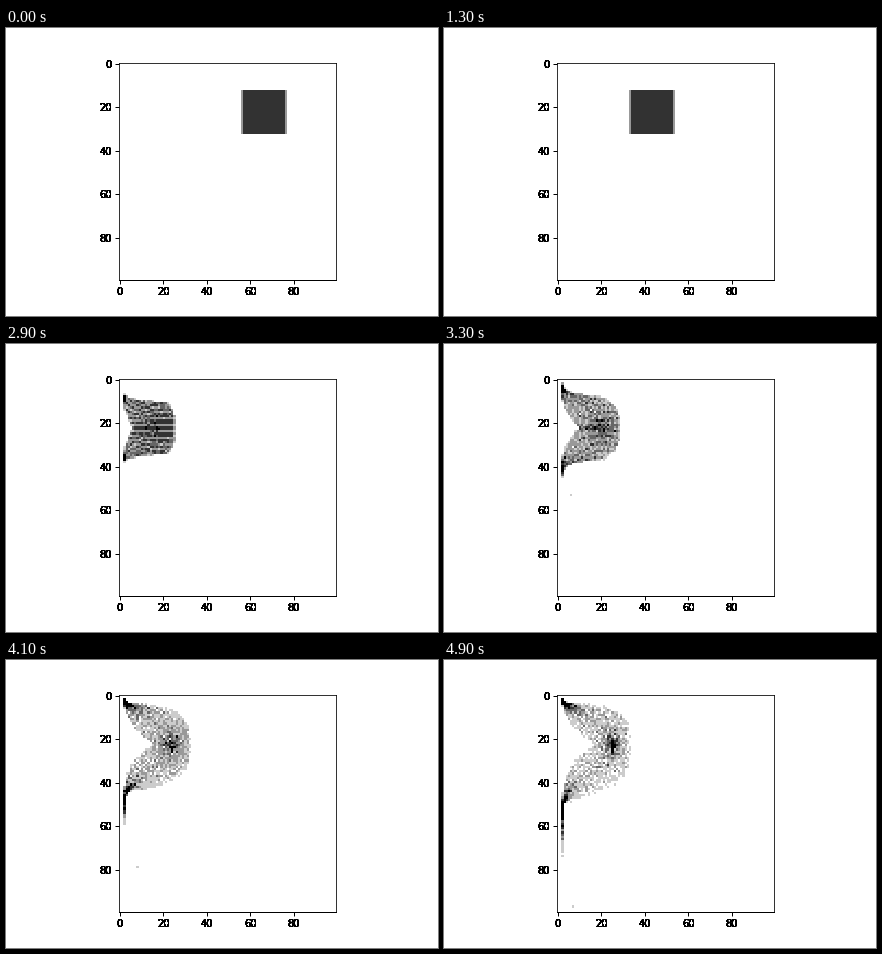
A matplotlib script for the animation above (5 s loop, 432x288 px).

```python
import numpy as np
import matplotlib.pyplot as plt
from matplotlib.animation import FuncAnimation

WIDTH, HEIGHT, DPI = 432, 288, 72
GRID = 100        # cells per side
SIDE = 40         # particles per side of the block
FRAMES = 50
IMPACT = 26       # step at which the block reaches the wall
FALL = 0.0229     # half the acceleration towards the left wall
WALL = 2          # first cell the particles may enter
FULL = 5          # particles in a cell that give pure black

plt.rcParams.update({"font.family": "DejaVu Sans", "font.size": 10})

rng = np.random.default_rng(4)
jitter = rng.normal(0, 0.015, (2, SIDE, SIDE))
steps = np.arange(SIDE)
depth, place = np.meshgrid(steps / (SIDE - 1),              # 0 hits first
                           np.linspace(-1, 1, SIDE),        # top to bottom
                           indexing="ij")


def block(step):
    """Rigid block in free fall."""
    left = 56.9 - 1.471 * step - FALL * step**2
    return np.array(np.meshgrid(left + steps / 2, 13.25 + steps / 2,
                                indexing="ij"))


def splash_velocity():
    """The middle bounces back while the flanks shoot along the wall."""
    bounce = 1.08 + 0.16 * np.cos(np.pi * (depth - 0.15) / 0.7)
    drag = (2.2 - 0.9 * depth) * np.abs(place) ** (1.1 + 2.9 * depth**2)
    spread = 0.7 + 1.1 * (1 - depth) ** 2.5
    along = np.sign(place) * np.abs(place) ** (1 + 0.6 * (1 - depth))
    return np.array([bounce - drag, spread * along])


VELOCITY = splash_velocity() + jitter


def positions(step):
    if step <= IMPACT:
        return block(step)
    time = step - IMPACT
    free = block(IMPACT) + VELOCITY * time
    free[0] -= FALL * time**2
    # Particles pile up softly at the left and upper walls.
    soft = 0.25 * time
    return WALL + soft * np.logaddexp(0, (free - WALL) / soft)


def density(step):
    cols, rows = np.clip(positions(step), WALL, GRID - 1).astype(int)
    cells = np.zeros((GRID, GRID))
    np.add.at(cells, (rows, cols), 1)
    if step >= 30:  # stray drop
        row = min(53.2 + 3.25 * (step - 33), 97)
        col = 8.4 - 0.027 * (step - 42) ** 2
        cells[int(row), int(col)] += 1
    return cells


fig = plt.figure(figsize=(WIDTH / DPI, HEIGHT / DPI), dpi=DPI,
                 facecolor="white")
SIZE = 0.755 * HEIGHT
ax = fig.add_axes([(221.4 - SIZE / 2) / WIDTH, 0.125, SIZE / WIDTH, 0.755])
image = ax.imshow(density(0), cmap="gray_r", vmin=0, vmax=FULL,
                  interpolation="nearest", aspect="auto")
ticks = range(0, GRID, 20)
ax.set(xticks=ticks, yticks=ticks)
ax.tick_params(width=1, length=4, pad=3)
ax.spines["bottom"].set_linewidth(1)

# Stacked labels give the numbers their hard, heavy edges.
x_place, x_va, x_ha = ax.get_xaxis_text1_transform(7)
y_place, y_va, y_ha = ax.get_yaxis_text1_transform(7)
for _ in range(25):
    for tick in ticks:
        ax.text(tick, 0, str(tick), transform=x_place, va=x_va, ha=x_ha)
        ax.text(0, tick, str(tick), transform=y_place, va=y_va, ha=y_ha)


def update(step):
    image.set_data(density(step))
    return [image]


anim = FuncAnimation(fig, update, frames=FRAMES, interval=100,
                     repeat=True, repeat_delay=0, blit=False)
plt.show()
```
